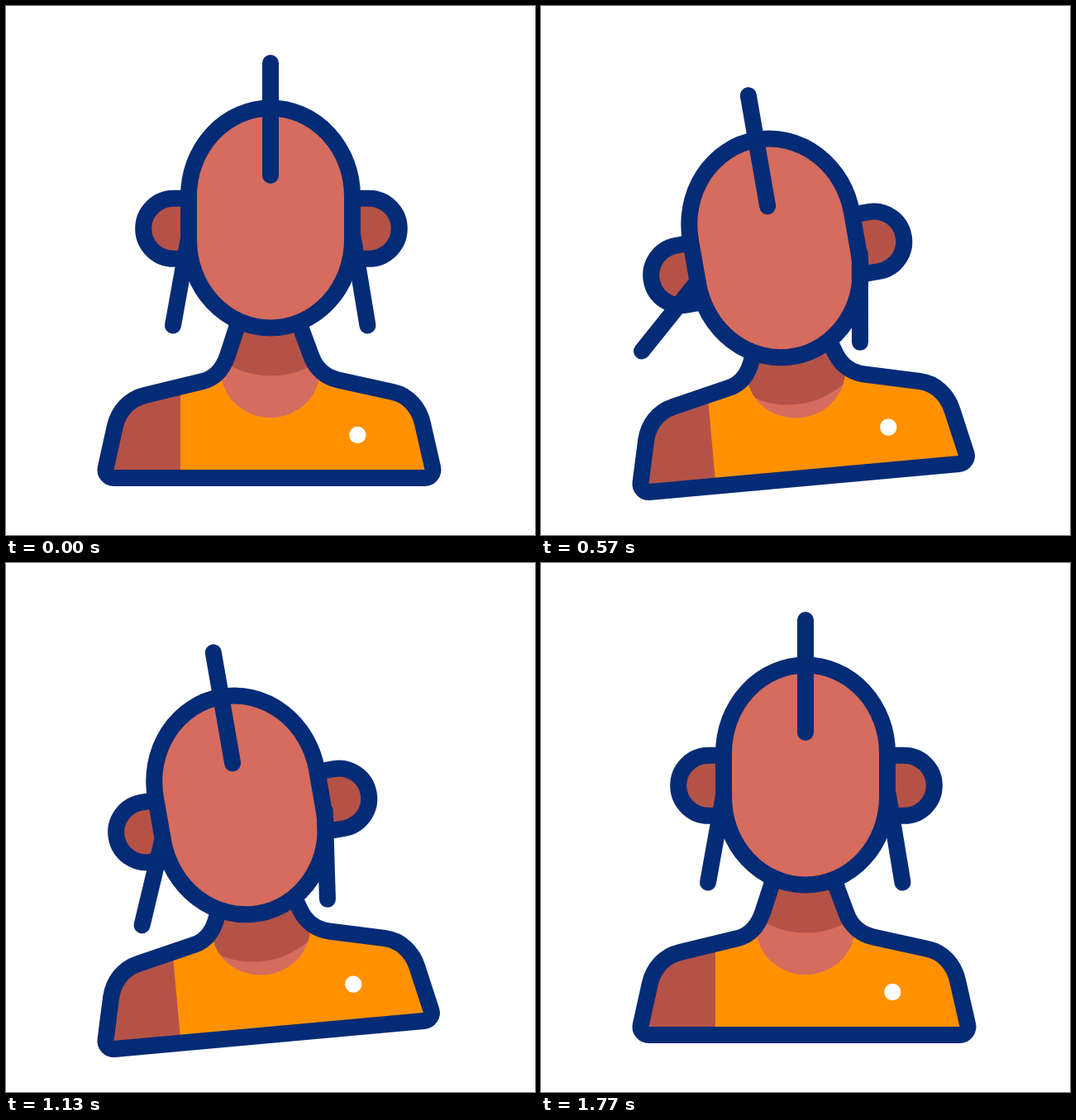
Recreate the animation shown at these times as an HTML page with a canvas. Size 640 px wide and 640 px high, loop 2 s.

```html
<!DOCTYPE html>
<html lang="en">
<head>
<meta charset="utf-8">
<title>Swaying figure</title>
<style>
  html, body { margin: 0; width: 100%; height: 100%; overflow: hidden; background: #fff; }
  canvas { display: block; }
</style>
</head>
<body>
<canvas id="stage" width="640" height="640"></canvas>
<script>
const ctx = document.getElementById('stage').getContext('2d');
const NAVY = '#042b76', SKIN = '#d56c5e', SHADE = '#b55247', SHIRT = '#ff9100';
const LOOP = 2000, STEP = 100 / 3;

// Key times, counted in steps; the earrings trail behind the body.
const SWAY = [0, 12.7, 25.45, 38.35, 50.2];
const HANG_L = [0, 15.5, 27.3, 40.5, 53];
const HANG_R = [0, 13, 25.8, 38.3, 50.2];

// Swings rest -> left -> right -> left -> rest, easing in and out of each pose.
function swing(f, keys, left, right) {
  const vals = [0, left, right, left, 0];
  for (let i = 1; i < keys.length; i++) {
    if (f < keys[i]) {
      const p = (f - keys[i - 1]) / (keys[i] - keys[i - 1]);
      return vals[i - 1] + (vals[i] - vals[i - 1]) * p * p * (3 - 2 * p);
    }
  }
  return 0;
}

function turn(x, y, deg) {
  ctx.translate(x, y);
  ctx.rotate(deg * Math.PI / 180);
  ctx.translate(-x, -y);
}

function paint(path, fill) {
  ctx.fillStyle = fill;
  ctx.fill(path);
  ctx.stroke(path);
}

function bar(x1, y1, x2, y2) {
  ctx.beginPath();
  ctx.moveTo(x1, y1);
  ctx.lineTo(x2, y2);
  ctx.stroke();
}

function earring(x1, y1, x2, y2, deg) {
  ctx.save();
  turn(x1, y1, deg);
  bar(x1, y1, x2, y2);
  ctx.restore();
}

function bodyPath() {
  const p = new Path2D();
  p.moveTo(284, 374);
  p.lineTo(268, 423);
  p.bezierCurveTo(262.5, 439, 252.5, 450.5, 238, 454);
  p.lineTo(168, 471);
  p.bezierCurveTo(149, 475.5, 136.5, 490, 132, 508);
  p.arcTo(118, 571, 318, 571, 10);
  p.arcTo(519, 571, 504, 505, 10);
  p.lineTo(504, 505);
  p.bezierCurveTo(500, 487, 487, 471, 468, 467);
  p.lineTo(402, 452.5);
  p.bezierCurveTo(387, 449, 375, 439, 369.5, 424);
  p.lineTo(351, 374);
  return p;
}

function headPath() {
  const p = new Path2D();
  p.ellipse(320, 230, 99, 106.5, 0, Math.PI, 2 * Math.PI);
  p.ellipse(320, 283, 99, 106.5, 0, 0, Math.PI);
  p.closePath();
  return p;
}

function earPath(x, edge) {
  const p = new Path2D(), isLeft = x < edge;
  p.moveTo(edge, 232.8);
  p.lineTo(x, 232.8);
  p.arc(x, 269.3, 36.5, -Math.PI / 2, Math.PI / 2, isLeft);
  p.lineTo(edge, 305.8);
  return p;
}

function neckPath() {
  const p = new Path2D();
  p.rect(261, 360, 118, 82);
  p.ellipse(320, 442, 59.5, 56, 0, 0, Math.PI);
  return p;
}

const body = bodyPath(), head = headPath(), neck = neckPath();
const ears = [earPath(202.7, 221), earPath(439.3, 419)];

function draw(f) {
  const lean = swing(f, SWAY, -11, 11);
  const nod = swing(f, SWAY, -9, 7.2);
  const drop = swing(f, SWAY, 46, 0);
  const placeHead = () => {
    ctx.translate(0, drop);
    turn(320, 400, nod);
  };

  ctx.setTransform(1, 0, 0, 1, 0, 0);
  ctx.fillStyle = '#fff';
  ctx.fillRect(0, 0, 640, 640);
  ctx.strokeStyle = NAVY;
  ctx.lineWidth = 20;
  ctx.lineCap = 'butt';
  ctx.lineJoin = 'round';

  turn(319, 570, lean);

  // Clothes and neck, with the shadow that follows the head
  ctx.save();
  ctx.clip(body);
  ctx.fillStyle = SHIRT;
  ctx.fillRect(100, 360, 440, 220);
  ctx.fillStyle = SHADE;
  ctx.fillRect(100, 440, 111, 140);
  ctx.fillStyle = SKIN;
  ctx.fill(neck);
  ctx.clip(neck);
  placeHead();
  ctx.fillStyle = SHADE;
  ctx.beginPath();
  ctx.ellipse(320.5, 331, 109, 116.5, 0, 0, 2 * Math.PI);
  ctx.fill();
  ctx.restore();

  ctx.stroke(body);
  ctx.fillStyle = '#fff';
  ctx.beginPath();
  ctx.arc(425.3, 519, 10.2, 0, 2 * Math.PI);
  ctx.fill();

  // Head
  placeHead();
  ears.forEach(ear => paint(ear, SHADE));
  paint(head, SKIN);
  ctx.lineCap = 'round';
  bar(320, 69, 320, 205);
  earring(221.2, 280, 202, 386.5, swing(f, HANG_L, 41, -16));
  earring(420, 281, 437.5, 386.5, swing(f, HANG_R, 28, -10));
}

const start = performance.now();
function tick() {
  const t = (performance.now() - start) % LOOP;
  draw(Math.floor((t + 3.4) / STEP));
  requestAnimationFrame(tick);
}
tick();
</script>
</body>
</html>
```
